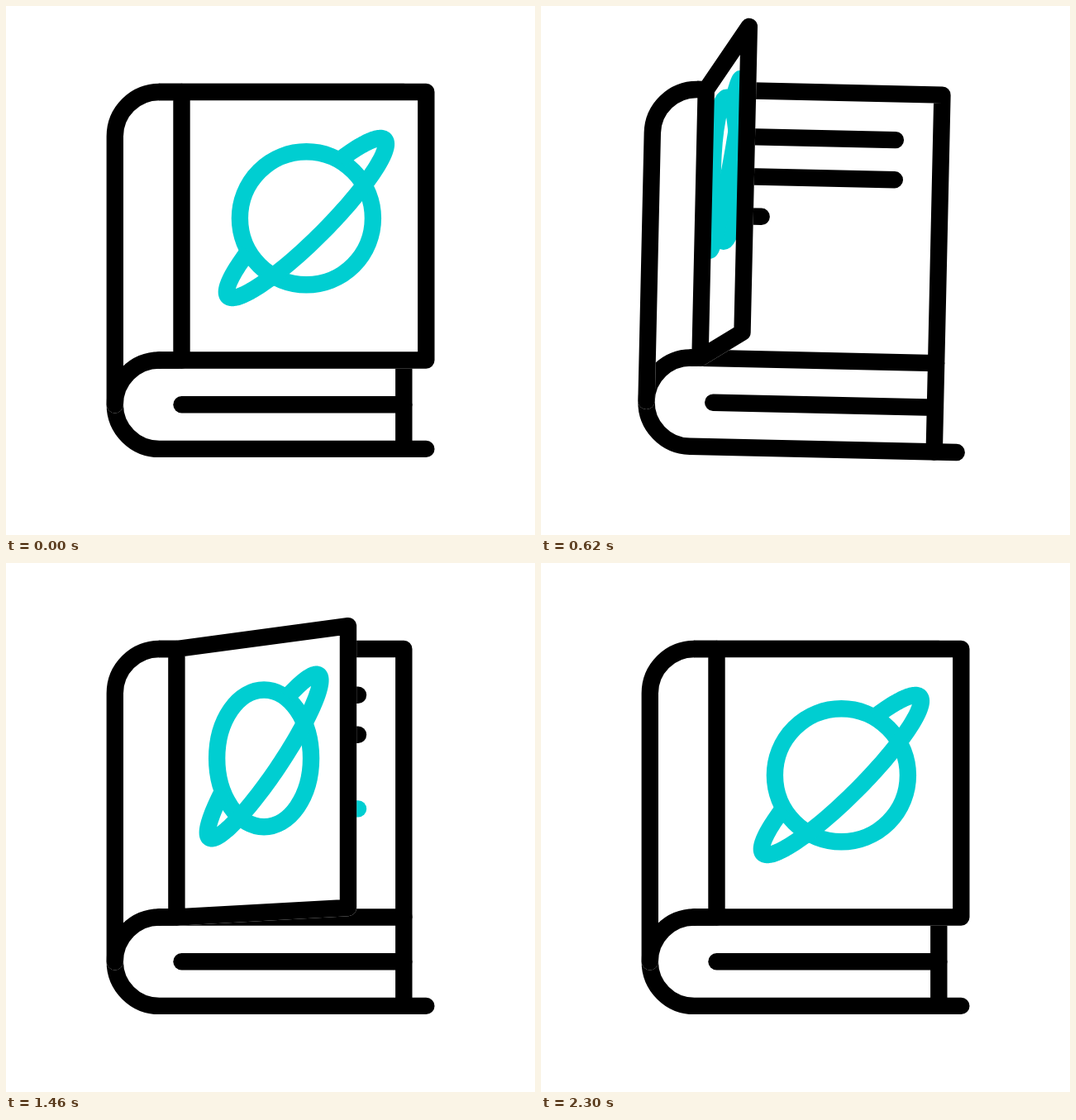
Write an HTML page with a canvas that moves like this. It is 640 px wide and 640 px high and loops after 2.4 s.

```html
<!DOCTYPE html>
<html lang="en">
<head>
<meta charset="utf-8">
<title>Opening book</title>
<style>
html, body { margin: 0; width: 100%; height: 100%; overflow: hidden; background: #fff; }
canvas { display: block; width: 640px; height: 640px; }
</style>
</head>
<body>
<canvas id="stage" width="640" height="640"></canvas>
<script>
const ctx = document.getElementById('stage').getContext('2d');
const LOOP = 2400, OPENED = 645, CLOSED = 2300;
const INK = '#000', TEAL = '#00ced1', WHITE = '#fff', WEIGHT = 20.4;
const LEFT = 131.8, BEND = 185.5, PAGE = 481.3, TOP = 104, FOLD = 428.5, MID = 482.2, BASE = 535.9;
const RADIUS = BASE - MID;

const clamp = v => Math.min(1, Math.max(0, v));
const mix = (a, b, p) => a + (b - a) * p;
const span = (t, from, to) => clamp((t - from) / (to - from));
const smooth = p => p * p * (3 - 2 * p);

// Ease with horizontal handles at x1 and x2, solved by bisection.
function ease(p, x1, x2) {
  let lo = 0, hi = 1;
  for (let i = 0; i < 24; i++) {
    const s = (lo + hi) / 2, r = 1 - s;
    if (3 * r * r * s * x1 + 3 * r * s * s * x2 + s * s * s < p) lo = s; else hi = s;
  }
  return smooth(lo);
}

function openness(t) {
  const p = t < OPENED
    ? ease(span(t, 0, OPENED), 0.68, 0.32)
    : 1 - ease(span(t, OPENED, CLOSED), 0.7, 0.18);
  return 1.035 * p;
}

const TILT = [[0, 0], [300, -3.6], [530, 2.05], [750, 0]];
function tilt(t) {
  for (let i = 1; i < TILT.length; i++) {
    const [t0, a0] = TILT[i - 1], [t1, a1] = TILT[i];
    if (t < t1) return mix(a0, a1, smooth(span(t, t0, t1))) * Math.PI / 180;
  }
  return 0;
}

function polygon(...points) {
  const path = new Path2D();
  points.forEach(([x, y], i) => i ? path.lineTo(x, y) : path.moveTo(x, y));
  return path;
}

function stroke(path, color = INK) {
  ctx.strokeStyle = color;
  ctx.stroke(path);
}

// A white pass below the ink leaves a hairline where it overlaps other ink.
function strokeOver(path) {
  stroke(path, WHITE);
  stroke(path);
}

const LINES = [
  { y: 159.7, end: 426, from: 330, to: 480 },
  { y: 207.8, end: 426, from: 440, to: 600 },
  { y: 256, end: 332, from: 560, to: 760 },
  { y: 297.4, end: 426, from: 740, to: 975, color: TEAL }
];

function drawPages(t) {
  stroke(polygon([BEND, TOP], [PAGE, TOP], [PAGE, BASE]));
  stroke(polygon([212.5, MID], [PAGE, MID]));
  stroke(polygon([BEND, FOLD], [PAGE, FOLD]));
  for (const { y, end, from, to, color } of LINES) {
    const p = smooth(span(t, from, to));
    if (p > 0) stroke(polygon([247, y], [mix(247, end, p), y]), color);
  }
}

function drawSpine() {
  const fold = new Path2D();
  fold.moveTo(508.3, BASE);
  fold.lineTo(BEND, BASE);
  fold.arc(BEND, MID, RADIUS, Math.PI / 2, Math.PI * 1.5);
  stroke(fold);

  const back = new Path2D();
  back.moveTo(LEFT, MID);
  back.lineTo(LEFT, TOP + RADIUS);
  back.arc(BEND, TOP + RADIUS, RADIUS, Math.PI, Math.PI * 1.5);
  strokeOver(back);
}

function drawPlanet(k) {
  const x = 363.4 - 138 * k, sx = 1 - 0.787 * k, sy = 1 + 0.078 * k;
  const globe = new Path2D();
  globe.ellipse(x, 256.8 - 55 * k, 80.5 * sx, 80.5 * sy, 0, 0, Math.PI * 2);

  const ring = new Path2D(), ringY = 256.5 - 60.5 * k;
  const gap = 54.6 * Math.PI / 180, steps = 120;
  for (let i = 0; i <= steps; i++) {
    const a = mix(-gap, Math.PI + gap, i / steps);
    const along = 134 * Math.cos(a) * Math.SQRT1_2, across = 26 * Math.sin(a) * Math.SQRT1_2;
    ring.lineTo(x + (along + across) * sx, ringY + (across - along) * sy);
  }
  stroke(globe, TEAL);
  ctx.lineCap = 'butt';
  stroke(ring, TEAL);
  ctx.lineCap = 'round';
}

function drawCover(k) {
  const hinge = 212.5 - 16.4 * k, edge = 508.3 - 253.8 * k;
  const cover = polygon([hinge, TOP], [edge, TOP - 75 * k], [edge, FOLD - 31 * k], [hinge, FOLD]);
  cover.closePath();
  ctx.fillStyle = WHITE;
  ctx.fill(cover);
  stroke(cover, WHITE);
  ctx.save();
  ctx.clip(cover);
  drawPlanet(k);
  ctx.restore();
  stroke(cover);
  // Join the spine to the hinge without a seam.
  for (const y of [TOP, FOLD]) stroke(polygon([BEND, y], [hinge, y]));
}

function draw(t) {
  ctx.setTransform(1, 0, 0, 1, 0, 0);
  ctx.fillStyle = WHITE;
  ctx.fillRect(0, 0, 640, 640);
  ctx.lineWidth = WEIGHT;
  ctx.lineCap = ctx.lineJoin = 'round';
  ctx.translate(320, 290);
  ctx.rotate(tilt(t));
  ctx.translate(-320, -290);
  drawPages(t);
  drawSpine();
  drawCover(openness(t));
}

function tick() {
  draw(performance.now() % LOOP);
  requestAnimationFrame(tick);
}
tick();
</script>
</body>
</html>
```
